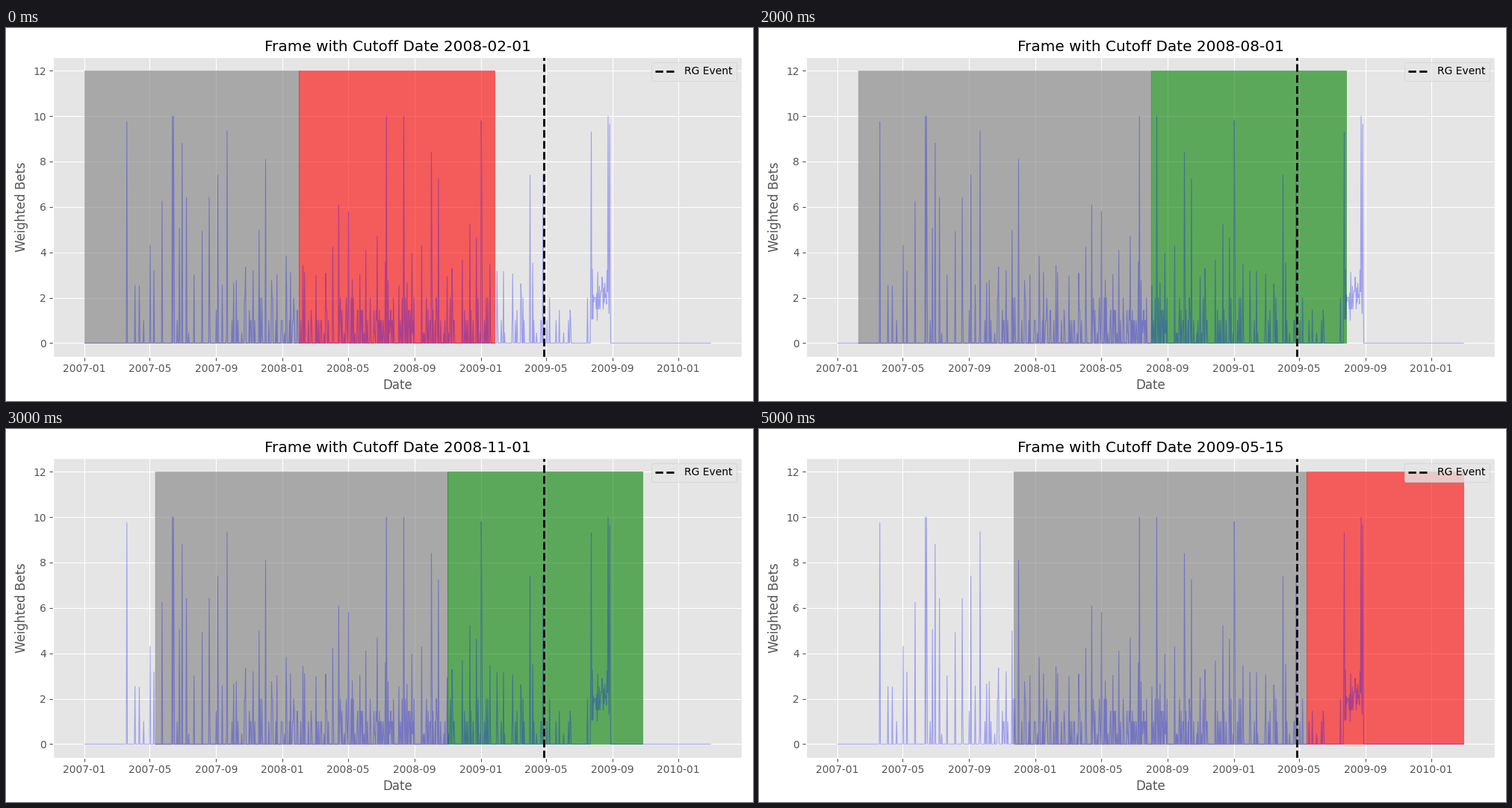
A matplotlib script for the animation above (6 s loop, 1000 px wide and 500 px high).

```python
import matplotlib.pyplot as plt
import numpy as np
from matplotlib.animation import FuncAnimation

plt.style.use("ggplot")

START = np.datetime64("2007-01-01")
LAST = 1155          # final day of the record
TRAIN, TEST = 540, 360
TOP = 12

# (cutoff date, colour of the test window)
WINDOWS = [
    ("2008-02-01", "red"), ("2008-04-15", "red"), ("2008-08-01", "green"),
    ("2008-11-01", "green"), ("2009-02-05", "green"), ("2009-05-15", "red"),
]

# The tallest peaks
PEAKS = {78: 9.75, 162: 10, 164: 10, 180: 8.8, 263: 9.35, 334: 8.1, 557: 10,
         589: 10, 640: 8.4, 732: 9.8, 935: 9.3, 966: 10, 969: 9.65}


def day(date):
    return int((np.datetime64(date) - START).astype(int))


def make_bets():
    rng = np.random.default_rng(7)
    days = np.arange(LAST + 1)

    # small bets grow more frequent, then fade out
    chance = np.interp(days, [76, 230, 300, 550, 750, 860, 930],
                       [0, .12, .22, .32, .3, .12, .05], left=0, right=0)
    size = rng.choice([.45, 1, 1.45, 2], days.size, p=[.2, .45, .15, .2])
    bets = np.where(rng.random(days.size) < chance, size, 0)

    # medium peaks, one every two weeks or so
    medium = np.arange(84, 850, 14) + rng.integers(0, 12, 55)
    bets[medium] = np.clip(2.5 + rng.exponential(1.7, medium.size), 0, 7.4)

    # last busy month
    burst = slice(934, 971)
    bets[burst] = rng.choice([1, 1.5, 2], 37) + 3 * rng.random(37) ** 4

    bets[list(PEAKS)] = list(PEAKS.values())
    return bets


fig, ax = plt.subplots(figsize=(10, 5), dpi=100)
fig.subplots_adjust(left=0.0633, right=0.985, bottom=0.1186, top=0.9222)
ax.plot(make_bets(), color="blue", alpha=0.3, linewidth=0.8)
ax.axvline(day("2009-04-28"), color="black", linestyle="--", linewidth=2,
           label="RG Event")

ax.set_xlim(-0.05 * LAST, 1.05 * LAST)
ax.set_ylim(-0.05 * TOP, 1.05 * TOP)
months = np.arange("2007-01", "2010-02", 4, dtype="datetime64[M]")
ax.set_xticks([day(m) for m in months], months.astype(str))
ax.set_yticks(range(0, TOP + 1, 2))
ax.set_xlabel("Date")
ax.set_ylabel("Weighted Bets")
ax.legend(loc="upper right")


def shade(first, last, color):
    days = np.arange(max(first, 0), min(last, LAST) + 1)
    ax.fill_between(days, 0, TOP, color=color, alpha=0.6)


def update(i):
    for span in list(ax.collections):
        span.remove()
    date, color = WINDOWS[i]
    cut = day(date)
    shade(cut - TRAIN, cut, "gray")
    shade(cut, cut + TEST, color)
    ax.set_title(f"Frame with Cutoff Date {date}")
    return []


anim = FuncAnimation(fig, update, frames=len(WINDOWS), interval=1000,
                     repeat=True, repeat_delay=0)
plt.show()
```
